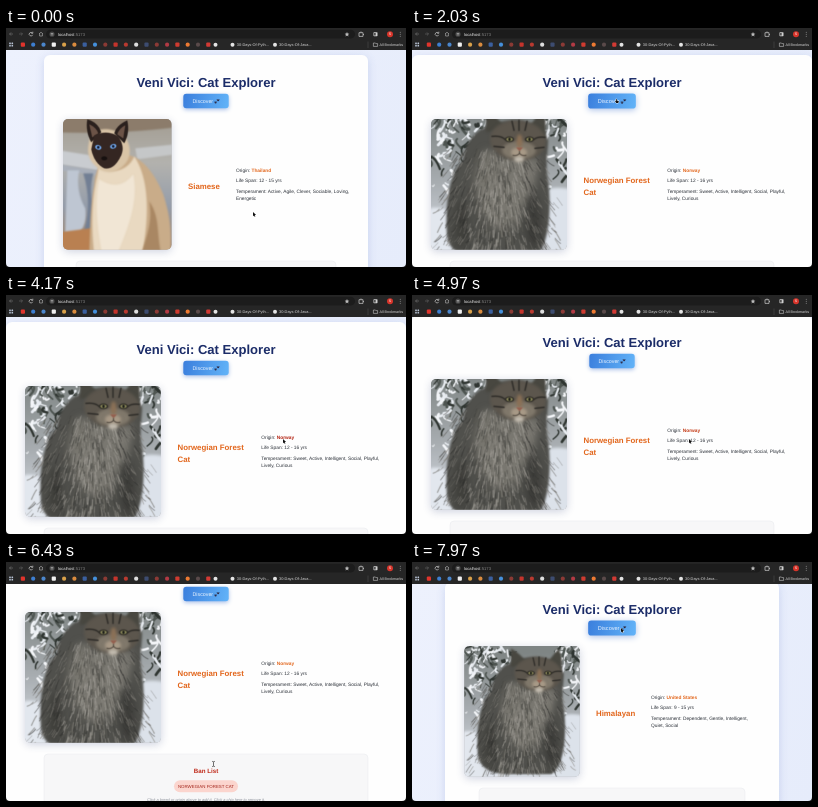
An HTML page with a canvas that plays this animation: 400 by 239 pixels, repeating every 8 s.

```html
<!DOCTYPE html>
<html lang="en">
<head>
<meta charset="utf-8">
<title>Cat Explorer</title>
<style>
  html, body { margin: 0; width: 100%; height: 100%; overflow: hidden; background: #eaeffc; }
  canvas { display: block; width: 400px; height: 239px; }
</style>
</head>
<body>
<canvas id="stage"></canvas>
<script>
const LOOP = 8000, W = 400, H = 239;
const canvas = document.getElementById('stage');
const ratio = window.devicePixelRatio || 1;
canvas.width = W * ratio;
canvas.height = H * ratio;
let ctx = canvas.getContext('2d');

const ORANGE = '#e2661c', RED = '#b3200f', INK = '#2b3038';

// ---------- helpers ----------
const clamp = v => Math.max(0, Math.min(1, v));
const smooth = v => v * v * (3 - 2 * v);
const pulse = (t, from, to, fade = 120) => clamp((t - from) / fade) * clamp((to - t) / fade);

function track(keys, t) {
  const i = keys.findIndex(k => k[0] > t);
  if (i < 0) return keys[keys.length - 1].slice(1);
  if (i === 0) return keys[0].slice(1);
  const a = keys[i - 1], b = keys[i], p = smooth((t - a[0]) / (b[0] - a[0]));
  return a.slice(1).map((v, n) => v + (b[n + 1] - v) * p);
}

function seeded(seed) {
  return () => (seed = (seed * 16807) % 2147483647) / 2147483647;
}

function mix(a, b, p) {
  const part = (hex, i) => parseInt(hex.slice(i, i + 2), 16);
  return `rgb(${[1, 3, 5].map(i => Math.round(part(a, i) + (part(b, i) - part(a, i)) * p))})`;
}

function text(str, x, y, size, color, style = '', align = 'left') {
  ctx.font = `${style} ${size}px "Liberation Sans", Arial, sans-serif`;
  ctx.textAlign = align;
  ctx.textBaseline = 'alphabetic';
  ctx.fillStyle = color;
  ctx.fillText(str, x, y + size * 0.35);
  return ctx.measureText(str).width;
}

function box(x, y, w, h, r, fill, stroke, shadow) {
  ctx.save();
  ctx.beginPath();
  ctx.roundRect(x, y, w, h, r);
  if (shadow) {
    ctx.shadowColor = shadow[0];
    ctx.shadowBlur = shadow[1] * ratio;
    ctx.shadowOffsetY = shadow[2] * ratio;
  }
  ctx.fillStyle = fill;
  ctx.fill();
  ctx.restore();
  if (stroke) {
    ctx.strokeStyle = stroke;
    ctx.lineWidth = 0.4;
    ctx.stroke();
  }
}

function blob(color, x, y, rx, ry = rx, turn = 0) {
  ctx.fillStyle = color;
  ctx.beginPath();
  ctx.ellipse(x, y, rx, ry, turn, 0, 7);
  ctx.fill();
}

function shape(color, d) {
  ctx.fillStyle = color;
  ctx.fill(new Path2D(d));
}

function line(color, width, d) {
  ctx.strokeStyle = color;
  ctx.lineWidth = width;
  ctx.stroke(new Path2D(d));
}

function gradient(x0, y0, x1, y1, ...colors) {
  const g = ctx.createLinearGradient(x0, y0, x1, y1);
  colors.forEach((c, i) => g.addColorStop(i / (colors.length - 1), c));
  return g;
}

// ---------- pictures, centred on 0,0 ----------
const soften = px => { ctx.filter = px ? `blur(${px * PIC_SCALE}px)` : 'none'; };

function siamese() {
  ctx.fillStyle = gradient(0, -65, 0, 65, '#a39d92', '#b3b2ae', '#959daa', '#a4866a');
  ctx.fillRect(-75, -86, 150, 172);
  soften(0.9);
  shape('#8c7c6b', 'M-58-70H58V-57Q0-50-58-52Z');
  shape('#c9ccd0', 'M-58-34L-14-27V-13L-58-20Z');
  shape('#a9afb9', 'M-58-20L-14-13V-8L-58-14Z');
  shape('#bec6d2', 'M-50-14H-38Q-42 6-32 24Q-30 40-38 48H-52Z');
  shape('#727f94', 'M-34-11H-24Q-29 10-23 22V46H-33Q-25 18-34-11Z');
  shape('#b98051', 'M-58 48L-20 43V70H-58Z');
  shape('#c5c7c8', 'M18-36L58-40V-30L20-25Z');

  shape('#c9ac89', 'M8-30C25-28 38-10 46 10C54 34 54 52 53 70H-28C-27 43-27 20-23 1Q-22-18-11-27Z');
  shape('#e9d9c1', 'M-18-19C-5-8 12-15 17-28C29-10 34 20 25 70H-23C-27 35-24 8-20-8Z');
  shape('#f1e6d5', 'M-18-5C-2 5 8 0 16-10C22 20 8 49 0 70H-15C-21 38-22 15-18-5Z');
  shape('#a98763', 'M32 17C43 33 39 48 44 70H24C31 47 35 37 32 17Z');

  shape('#d9c4a6', 'M-27-50Q-12-61 7-49Q17-34 9-22Q-2-8-16-14Q-31-23-29-38Z');
  soften(0.4);
  shape('#2a201d', 'M-30-65Q-19-62-16-52L-26-42Q-32-53-30-65Z');
  shape('#2a201d', 'M10-64Q-1-59-3-51L7-41Q13-52 10-64Z');
  shape('#6b5347', 'M-28-60Q-21-57-19-51L-25-47Z');
  shape('#6b5347', 'M8-59Q2-56 0-50L6-46Z');
  shape('#342622', 'M-23-49Q-10-55 1-48Q8-38 4-29Q-3-14-13-16Q-23-21-26-35Z');
  blob('#70a6ea', -19, -37, 3.2, 2.3, 0.3);
  blob('#70a6ea', -4, -38, 3.2, 2.3, -0.3);
  blob('#101425', -19, -37, 1.3);
  blob('#101425', -4, -38, 1.3);
  blob('#171110', -13, -26, 3, 2);
}

function forestCat() {
  const rnd = seeded(71);
  ctx.lineCap = 'round';
  ctx.fillStyle = gradient(0, -70, 0, 70, '#7f8584', '#a9aeb2', '#dfe4ec');
  ctx.fillRect(-75, -86, 150, 172);

  // Snowy twigs, thinning out towards the ground.
  soften(0.4);
  for (let i = 0; i < 190; i++) {
    const x = i % 3 ? -70 + rnd() * 60 : 40 + rnd() * 30;
    const y = -80 + rnd() * rnd() * 130;
    line(['#2f3531', '#e9edf2', '#4e5551', '#f4f6f9'][i % 4], 0.8 + rnd() * 2.2,
      `M${x} ${y}q${rnd() * 8 - 4} 3 ${rnd() * 18 - 9} ${rnd() * 12}`);
  }
  soften(1.5);
  shape('#e2e7ee', 'M-75 26Q-56 18-42 34V84H-75Z');
  shape('#dce2ea', 'M42 8Q55 0 75 6V84H40Z');

  soften(1);
  shape('#50504c', 'M-12-58C-30-50-34-36-36-24C-50-10-54 20-52 50Q-50 74-14 74H34C50 66 53 24 49-4C46-20 49-30 49-44Q42-62 18-64Q0-64-12-58Z');
  shape('#484740', 'M-13-52L-13-74Q-2-68 6-57Z M30-58L43-74Q49-60 46-46Z');
  soften(4);
  shape('#797770', 'M-14-34C-30-8-26 14-8 40Q10 54 24 28Q38 0 40-26Z');
  blob('#3d3d3a', 34, 38, 8, 28);
  blob('#3f3f3b', -38, 40, 7, 26);

  soften(0.35);
  ctx.globalAlpha = 0.6;
  for (let i = 0; i < 950; i++) {
    const y = -36 + rnd() * 106;
    const spread = (rnd() + rnd() - 1) * 1.25;
    const x = -1 + spread * (40 + clamp((y + 36) / 50) * 11);
    const tones = Math.abs(spread) < 0.55 ? ['#3e3e3a', '#94918a', '#aaa7a0', '#5d5b55'] : ['#2f2f2d', '#6e6c67', '#85827c', '#474642'];
    line(tones[i % 4], 0.4 + rnd() * 0.7, `M${x} ${y}q${spread * 2} 3 ${spread * 5 + rnd() * 2 - 1} ${4 + rnd() * 6}`);
  }
  ctx.globalAlpha = 1;

  soften(1.4);
  blob('#5c564d', 19, -44, 28, 20, 0.08);
  blob('#80786b', 20, -34, 17, 9);
  blob('#a89a87', 20, -32, 8, 5);
  blob('#c3bcb0', 20, -25, 5, 3);
  blob('#8b7157', 20.5, -43, 3, 7);
  soften(0.5);
  line('#2f2d29', 1.5, 'M13-63L15-54M20-64V-54M28-63L26-54M-7-48Q2-49 6-45M46-47Q39-48 35-45M-5-38L5-37M45-37L36-36');
  [10.5, 30.5].forEach(x => {
    blob('#2a2824', x, -45, 4.6, 2.8);
    blob('#8f8c5c', x, -45, 3.2, 1.9);
    blob('#171917', x, -45, 1.2, 1.8);
  });
  shape('#94604f', 'M17-37H24L20.5-33Z');
  line('#3f372f', 0.9, 'M20.5-33V-31Q18-28 14-29M20.5-31Q23-28 27-29');
}

// Each picture is painted once on its own layer.
const PIC_SCALE = 3, PIC_W = 150, PIC_H = 172;
function paint(draw) {
  const layer = document.createElement('canvas');
  layer.width = PIC_W * PIC_SCALE;
  layer.height = PIC_H * PIC_SCALE;
  const main = ctx;
  ctx = layer.getContext('2d');
  ctx.scale(PIC_SCALE, PIC_SCALE);
  ctx.translate(PIC_W / 2, PIC_H / 2);
  draw();
  ctx = main;
  return layer;
}
const siamesePic = { layer: paint(siamese), width: 108.5 };
const forestPic = { layer: paint(forestCat), width: 136 };

function photo(pic, x, y, w, h) {
  box(x, y, w, h, 5, '#aaa', null, ['rgba(40,60,120,.22)', 9, 2]);
  const k = w / pic.width;
  ctx.save();
  ctx.beginPath();
  ctx.roundRect(x, y, w, h, 5);
  ctx.clip();
  ctx.imageSmoothingQuality = 'high';
  ctx.drawImage(pic.layer, x + w / 2 - PIC_W * k / 2, y + h / 2 - PIC_H * k / 2, PIC_W * k, PIC_H * k);
  ctx.restore();
}

// ---------- content ----------
const siam = {
  name: ['Siamese'], origin: 'Thailand', life: '12 - 15 yrs',
  mood: ['Active, Agile, Clever, Sociable, Loving,', 'Energetic'],
  pic: siamesePic, card: 38, imgX: 57, imgW: 108.5, nameX: 182, infoX: 230, panel: 70
};
const forest = {
  name: ['Norwegian Forest', 'Cat'], origin: 'Norway', life: '12 - 16 yrs',
  mood: ['Sweet, Active, Intelligent, Social, Playful,', 'Lively, Curious'],
  pic: forestPic, card: 0, imgX: 19, imgW: 136, nameX: 171.5, infoX: 255.3, panel: 38
};
const forestPending = {
  ...forest, pic: siamesePic,
  card: 17, imgX: 36, imgW: 108.5, nameX: 161, infoX: 244, panel: 52
};
const himalayan = {
  name: ['Himalayan'], origin: 'United States', life: '9 - 15 yrs',
  mood: ['Dependent, Gentle, Intelligent,', 'Quiet, Social'],
  pic: forestPic, card: 33, imgX: 52.3, imgW: 115.5, nameX: 184, infoX: 239, panel: 67
};
const catAt = t => t < 1400 ? siam : t < 1780 ? forestPending : t < 7830 ? forest : himalayan;

const cursorKeys = [
  [250, 247, 184], [800, 204, 70], [2350, 204, 71], [2950, 193, 153], [3500, 193, 153],
  [4100, 277, 144], [5000, 277, 144], [5500, 207.5, 202], [6600, 207.5, 202], [7200, 209, 66]
];
const scrollKeys = [[4780, 0], [4970, 7], [5450, 41], [6430, 41], [6650, 7]];

// ---------- page ----------
function paw(x, y) {
  const color = '#2c2740';
  blob(color, x, y + 0.6, 0.95, 0.75);
  [-1.1, -0.4, 0.4, 1.1].forEach(dx => blob(color, x + dx, y - 0.7 + Math.abs(dx) * 0.45, 0.36, 0.45));
}

function button(t) {
  const hover = Math.max(pulse(t, 680, 2480), pulse(t, 7080, 9000));
  const loading = (t > 900 && t < 1400) || (t > 7550 && t < 7830);
  const w = loading ? 41 : 45.4;
  ctx.save();
  ctx.translate(200, 73);
  ctx.scale(1 + 0.05 * hover, 1 + 0.05 * hover);
  const fill = gradient(-w / 2, -5, w / 2, 5, '#3b7fdd', '#62b3f8');
  box(-w / 2, -7.2, w, 14.4, 3, fill, null, ['rgba(45,100,200,.4)', 4 + 2 * hover, 1.5]);
  if (loading) {
    text('Loading...', 0, 0, 5.3, '#dcebfd', '', 'center');
  } else {
    text('Discover', -13.5, 0, 5.3, '#eef5ff');
    paw(9.6, 1.2);
    paw(12.1, -1);
  }
  ctx.restore();
}

function page(t) {
  const cat = catAt(t);
  ctx.fillStyle = gradient(0, 22, W, H, '#edf1fd', '#e6ecfb');
  ctx.fillRect(0, 22, W, H);
  ctx.save();
  ctx.translate(0, -track(scrollKeys, t)[0]);

  box(cat.card, 27, W - 2 * cat.card, 290, 6, '#fefefe', null, ['rgba(70,100,190,.2)', 10, 2]);
  text('Veni Vici: Cat Explorer', 200, 54, 13.05, '#1b2c68', 'bold', 'center');
  button(t);
  photo(cat.pic, cat.imgX, 91, cat.imgW, 130.7);

  const nameColor = mix(ORANGE, RED, pulse(t, 2820, 3700));
  const top = 158.5 - (cat.name.length - 1) * 5.8;
  cat.name.forEach((s, i) => text(s, cat.nameX, top + i * 11.6, 7.85, nameColor, 'bold'));

  const x = cat.infoX, size = 4.8;
  const used = text('Origin: ', x, 142, size, INK);
  text(cat.origin, x + used, 142, size, mix(ORANGE, RED, pulse(t, 3950, 5050)), 'bold');
  text('Life Span: ' + cat.life, x, 152.6, size, INK);
  text('Temperament: ' + cat.mood[0], x, 163, size, INK);
  text(cat.mood[1], x, 170.5, size, INK);

  box(cat.panel, 233, W - 2 * cat.panel, 62, 4, '#f7f7f8', '#e4e6ea');
  text('Ban List', 200, 250.3, 6.2, '#c02a1a', 'bold', 'center');
  if (t > 3330) {
    box(168, 259.3, 64, 12, 6, '#fbd5ce');
    text('NORWEGIAN FOREST CAT', 200, 265.2, 4.4, '#a3251b', '', 'center');
  }
  text('Click a breed or origin above to add it. Click a chip here to remove it.',
    200, 278.4, 3.9, '#8b9099', 'italic', 'center');
  ctx.restore();
}

// ---------- browser ----------
function browser() {
  ctx.fillStyle = '#262626';
  ctx.fillRect(0, 0, W, 22);
  box(40, 1.8, 309, 8.8, 4.4, '#1c1c1c');
  line('#777', 0.6, 'M7 6H3.5M5.1 4.4L3.5 6L5.1 7.6');
  line('#666', 0.6, 'M13 6H16.5M14.9 4.4L16.5 6L14.9 7.6');
  line('#c8c8c8', 0.7, 'M26.4 5A1.8 1.8 0 1 0 26.7 6.8M26.8 3.7V5.3H25.2');
  line('#b8b8b8', 0.6, 'M33 6L35 4.2L37 6M33.6 5.6V8H36.4V5.6');
  blob('#444', 46, 6.2, 2.6);
  line('#ccc', 0.6, 'M44.7 5.5H47.3M44.7 6.9H47.3');
  const host = text('localhost', 52, 6.2, 4.2, '#e8e8e8');
  text(':5173', 52 + host, 6.2, 4.2, '#858585');
  shape('#bbb', 'M341 4L341.7 5.5L343.3 5.7L342.1 6.8L342.4 8.4L341 7.6L339.6 8.4L339.9 6.8L338.7 5.7L340.3 5.5Z');
  line('#d0d0d0', 0.7, 'M353 4.7H357V8.4H353ZM355 4.7V3.5M357 6.5H358');
  box(367.5, 4.2, 4, 4, 0.6, '#d0d0d0');
  box(368.2, 5, 1.4, 2.4, 0, '#333');
  blob('#d8352b', 384, 6.2, 3);
  text('S', 384, 6.2, 3.6, '#fff', '', 'center');
  [4.2, 6.2, 8.2].forEach(y => blob('#ccc', 394.2, y, 0.45));

  for (let i = 0; i < 4; i++) box(3.2 + (i % 2) * 2.3, 14.6 + (i >> 1) * 2.3, 1.6, 1.6, 0.3, '#b9c4d6');
  const marks = ['#e0342c', '#3d7ed0', '#4b86cc', '#f0f0f0', '#d9a14a', '#d98b3e', '#3a5f9e', '#4590dc', '#8a3a34',
    '#c4342c', '#b93a30', '#dedede', '#3d4c70', '#8c3a36', '#b23a44', '#cf3b30', '#ee7a33', '#5a4a4a', '#d23a34'];
  marks.forEach((c, i) => box(14.8 + i * 10.3, 14.6, 4.2, 4.2, i % 3 === 0 ? 1 : 2.1, c));
  [209.5, 226.5, 269].forEach(x => blob('#e4e4e4', x, 16.7, 2));
  text('30-Days-Of-Pyth...', 230.8, 16.7, 3.9, '#d8d8d8');
  text('30-Days-Of-Java...', 273, 16.7, 3.9, '#d8d8d8');
  line('#555', 0.5, 'M362 13.5V20');
  line('#c8c8c8', 0.6, 'M367.4 15H369.2L369.8 15.6H371.6V18.4H367.4Z');
  text('All Bookmarks', 373.5, 16.7, 3.7, '#d8d8d8');
  shape('#111', 'M0 239V235Q0 239 4 239ZM400 239V235Q400 239 396 239Z');
}

function pointer(t) {
  const [x, y] = track(cursorKeys, t);
  ctx.save();
  ctx.translate(x, y);
  ctx.lineJoin = 'round';
  const beam = t > 5400 && t < 6700;
  const hand = (t > 1450 && t < 2480) || (t > 2820 && t < 3700) || (t > 7080 && t < 7550);
  if (beam) {
    line('#333', 0.7, 'M-1.3-2.6Q0-2.6 0-1.8V1.8Q0 2.6-1.3 2.6M1.3-2.6Q0-2.6 0-1.8M0 1.8Q0 2.6 1.3 2.6');
  } else {
    const d = hand
      ? 'M0 0Q.6-.2.7.4V1.6L2.4 2Q2.8 2.2 2.7 2.9L2.2 4.2H.2L-.9 2.6Q-.9 2-.2 2.3Z'
      : 'M0 0V4.2L1 3.4L1.6 4.8L2.4 4.4L1.8 3.1H3.1Z';
    line('#fff', 0.7, d);
    shape('#111', d);
  }
  ctx.restore();
}

function frame() {
  const t = performance.now() % LOOP;
  ctx.setTransform(ratio, 0, 0, ratio, 0, 0);
  ctx.textRendering = 'geometricPrecision';
  page(t);
  browser();
  pointer(t);
  requestAnimationFrame(frame);
}
frame();
</script>
</body>
</html>
```
